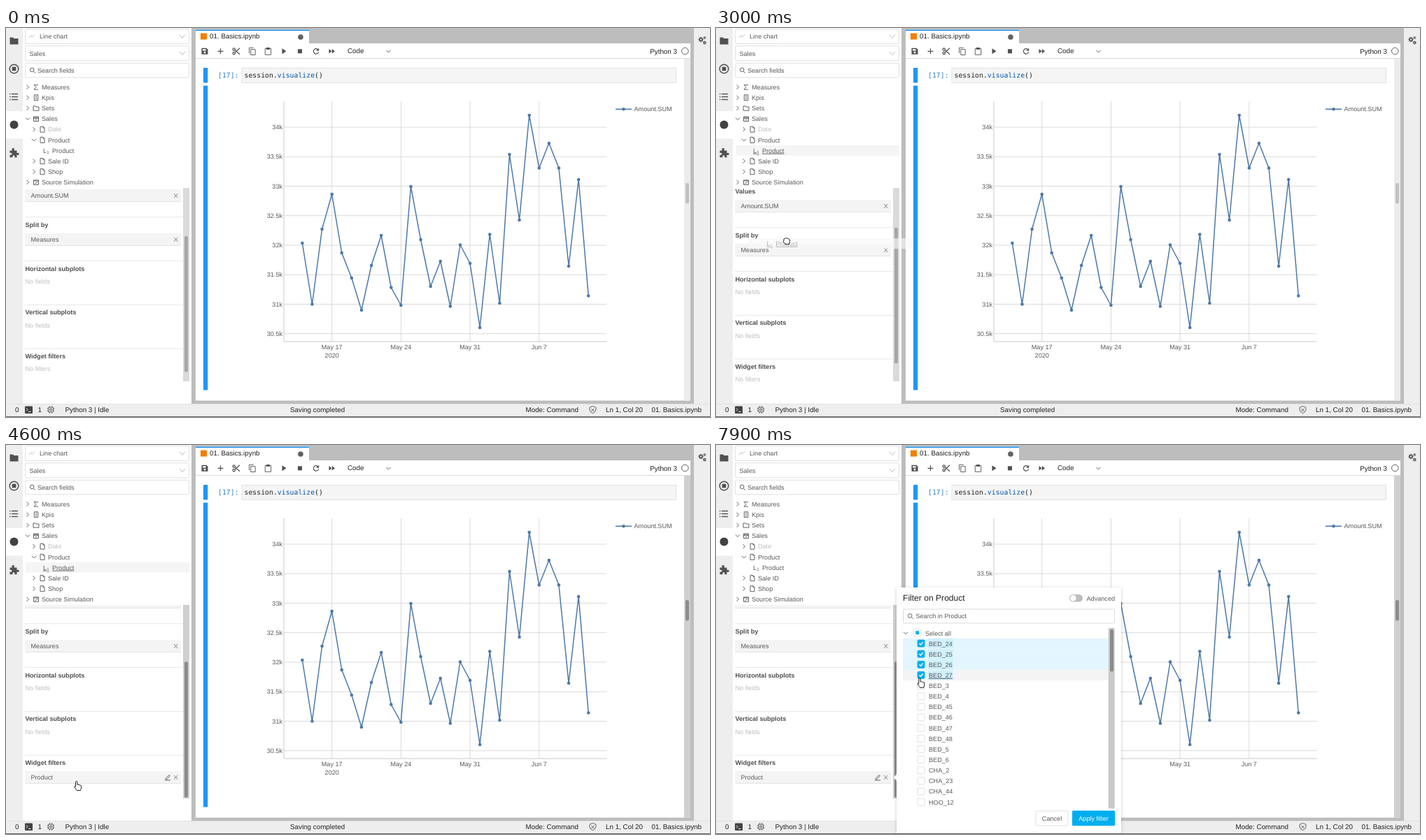
Recreate the animation shown at these times as an HTML page. Size 1006 px wide and 557 px high, loop 8000 ms.

```html
<!DOCTYPE html>
<html lang="en">
<head>
<meta charset="utf-8">
<title>Filtering a chart in a notebook</title>
<style>
html, body { margin: 0; width: 100%; height: 100%; overflow: hidden; background: #fff; }
svg { display: block; width: 1006px; height: 557px; }
text { font: 9.1px "Liberation Sans", Arial, sans-serif; fill: #595959; white-space: pre; text-rendering: geometricPrecision; }
.ui { font-size: 9.84px; fill: #212121; }
.bold { font-weight: bold; fill: #4d4d4d; }
.dim { fill: #bfbfbf; }
.code { font: 9.84px "DejaVu Sans Mono", monospace; fill: #212121; }
.title { font-size: 12.1px; fill: #222; }
.white { fill: #fff; }
.sub { font-size: 6px; }
.hover text { text-decoration: underline; }
.line { fill: none; stroke: #616161; stroke-width: 1; }
</style>
</head>
<body>
<script>
const LOOP = 8000, STEP = 100, ROW = 15.14;
const BLUE = '#2196f3', ACCENT = '#00aeef', DARK = '#505050', SERIES = '#4c78a8';

const text = (x, y, s, cls = '', anchor = 'start') =>
  `<text x="${x}" y="${y + 3.2}" class="${cls}" text-anchor="${anchor}">${s}</text>`;
const rect = (x, y, w, h, fill, extra = '') =>
  `<rect x="${x}" y="${y}" width="${w}" height="${h}" fill="${fill}" ${extra}/>`;
const box = (x, y, w, h, stroke = '#d9d9d9', fill = '#fff') =>
  rect(x, y, w, h, fill, `stroke="${stroke}" stroke-width=".8" rx="1.5"`);
const path = (d, x = 0, y = 0, extra = 'class="line"') =>
  `<path transform="translate(${x} ${y})" d="${d}" ${extra}/>`;
const solid = (d, x, y, fill = DARK) => path(d, x, y, `fill="${fill}" fill-rule="evenodd"`);
const circle = (x, y, r, extra) => `<circle cx="${x}" cy="${y}" r="${r}" ${extra}/>`;
const group = (id, body, extra = '') => `<g id="${id}" ${extra}>${body}</g>`;
const chevron = (x, y, open) => path(open ? 'M-3-1.5L0 1.5L3-1.5' : 'M-1.5-3L1.5 0L-1.5 3', x, y);
const magnifier = (x, y) => path('M1.4 1.4L4 4M2-.8a2.8 2.8 0 1 1-5.6 0a2.8 2.8 0 1 1 5.6 0', x, y);
const cross = (x, y) => path('M-2.6-3L2.6 3M2.6-3L-2.6 3', x, y, 'stroke="#777" stroke-width=".9"');
const level = (x, y) => text(x, y, 'L') + text(x + 5.3, y + 1.8, '1', 'sub');

function gear(x, y, r, teeth = 8) {
  const spokes = Array.from({ length: teeth }, (_, i) => {
    const a = i * 2 * Math.PI / teeth;
    return `M0 0L${(r * 1.35 * Math.cos(a)).toFixed(2)} ${(r * 1.35 * Math.sin(a)).toFixed(2)}`;
  }).join('');
  return path(spokes, x, y, `stroke="${DARK}" stroke-width="${r * .45}"`) +
    circle(x, y, r, `fill="${DARK}"`) + circle(x, y, r * .42, 'fill="#eee"');
}

function frame() {
  const puzzle = 'M-6-3h3.4q-1.4-3 1.2-3.4q2.8.3 1.4 3.4h4v3.6q3-1.3 3.3 1.2q-.3 2.6-3.3 1.3v3.7h-3.3q.8-3-1.3-3t-1.3 3h-4.1v-3.6q3 .6 3-1.4t-3-1.3z';
  const shield = 'M0-5L4.5-3.2V0q-.4 3.5-4.5 5.2Q-4.1 3.5-4.5 0v-3.2zM-2-1.5l4 4m0-4l-4 4';
  return rect(0, 0, 1006, 557, '#eee') +
    rect(24, 0, 241, 538, '#fff') + rect(0, 119, 25, 39.5, '#fff') +
    rect(265, 0, 718, 538, '#bdbdbd') + rect(271, 22, 707, 511.5, '#fff') +
    rect(271, 2.5, 162, 20, '#fff') + rect(271, 2.5, 162, 1.6, BLUE) +
    rect(271, 43, 707, 1, '#dcdcdc') +
    rect(0, 538, 1006, .7, '#ddd') + rect(0, 556, 1006, 1, '#666') +
    // left and right side bars
    solid('M-6-5h4.5l1.4 1.5H6V5H-6z', 11.5, 18.5) +
    circle(11.5, 58.5, 6.3, `fill="none" stroke="${DARK}" stroke-width="1.5"`) + rect(8.7, 55.7, 5.6, 5.6, DARK) +
    [-4, 0, 4].map(d => rect(5, 97.8 + d, 1.5, 1.4, DARK) + rect(8, 97.8 + d, 9, 1.4, DARK)).join('') +
    circle(11.5, 138.5, 6, 'fill="#424242"') +
    solid(puzzle, 11.5, 178.5) +
    gear(993, 16.5, 2.7) + gear(998.3, 21, 1.9) + gear(998.3, 14, 1.4) +
    // status bar
    text(13, 546.3, '0', 'ui') + rect(27, 541.5, 11, 10.5, '#424242', 'rx="1"') +
    path('M-3-2L-1 0L-3 2M0 3h3.5', 32, 546.5, 'fill="none" stroke="#fff" stroke-width=".9"') +
    text(45.5, 546.3, '1', 'ui') +
    path('M-3.4-3.4h6.8v6.8h-6.8zM-1.3-1.3h2.6v2.6h-2.6zM-1.5-5.2v1.8M1.5-5.2v1.8M-1.5 3.4v1.8M1.5 3.4v1.8M-5.2-1.5h1.8M-5.2 1.5h1.8M3.4-1.5h1.8M3.4 1.5h1.8', 64, 546.5) +
    text(84.5, 546.3, 'Python 3 | Idle', 'ui') + text(406, 546.3, 'Saving completed', 'ui') +
    text(742.5, 546.3, 'Mode: Command', 'ui') + path(shield, 838.5, 546.5) +
    text(857, 546.3, 'Ln 1, Col 20', 'ui') + text(994, 546.3, '01. Basics.ipynb', 'ui', 'end');
}

function notebook() {
  const y = 33.3;
  return rect(278, 7.5, 9, 9, '#f57c00') + text(291, 11.5, '01. Basics.ipynb', 'ui') +
    circle(421, 13, 3.8, 'fill="#616161"') +
    solid('M-4.5-4.5h7l2 2v7h-9zM-3-3v2.3h4.7v-2.3zM-1.5 1.8a1.5 1.5 0 1 0 3 0a1.5 1.5 0 1 0-3 0z', 284, y) +
    path('M-4 0h8M0-4v8', 306.5, y, `stroke="${DARK}" stroke-width="1.2"`) +
    path('M-2-2L5 4.5M-2 2L5-4.5M-1.6-2.8a1.7 1.7 0 1 1-3.4 0a1.7 1.7 0 1 1 3.4 0M-1.6 2.8a1.7 1.7 0 1 1-3.4 0a1.7 1.7 0 1 1 3.4 0', 329, y, `fill="none" stroke="${DARK}" stroke-width="1.2"`) +
    path('M-2.2-2.6h6.4v7.8h-6.4zM-4.4 2.8v-7.8h6.2', 352, y) +
    path('M-4.2-4h8.4v9h-8.4z', 374.5, y) + rect(372, 28, 5, 2.8, DARK) +
    solid('M-2.5-4L3.5 0L-2.5 4z', 397, y) + rect(417, 30.3, 6, 6, DARK) +
    path('M3.2-2A3.7 3.7 0 1 0 3.7 1', 443, y, `fill="none" stroke="${DARK}" stroke-width="1.2"`) + solid('M4.2-4.6v4h-4z', 443, y) +
    solid('M-4-3.2L0 0L-4 3.2zM.3-3.2L4.5 0L.3 3.2z', 465.5, y) +
    text(488, 33, 'Code', 'ui') + chevron(546.5, 33.5, true) +
    text(959, 33.3, 'Python 3', 'ui', 'end') +
    circle(970.3, 33, 4.8, 'fill="#fff" stroke="#616161"') +
    rect(282, 57, 6.3, 21.5, BLUE, 'rx=".8"') + rect(282, 82.5, 6.3, 436, BLUE, 'rx=".8"') +
    rect(337, 57.3, 620.5, 21, '#f5f5f5', 'stroke="#dcdcdc" stroke-width=".8"') +
    `<text x="303" y="71.3" class="code" style="fill:#307fc1">[17]:</text>` +
    `<text x="340.5" y="71.3" class="code">session.<tspan fill="#0055aa">visualize</tspan>()</text>` +
    rect(969, 44, 9, 489.5, '#ececec', 'id="mainTrack"') + rect(971, 222, 5, 29.5, '#c2c2c2', 'id="mainThumb" rx="2"');
}

function chart() {
  const ys = [308, 395.5, 288, 238, 322, 358, 404, 340, 297, 371.5, 397, 227, 303, 370, 334,
    398.5, 310.5, 337, 429, 295.5, 394, 181, 275, 125, 200.5, 165, 200.5, 341, 217, 383.5];
  const points = ys.map((y, i) => [+(423.4 + i * 14.1).toFixed(1), y]);
  let out = '';
  ['34k', '33.5k', '33k', '32.5k', '32k', '31.5k', '31k', '30.5k'].forEach((label, i) => {
    const y = 142 + i * 42.25;
    out += rect(397, y - .4, 461.5, .8, '#d2d2d2') + text(395, y, label, '', 'end');
  });
  ['May 17', 'May 24', 'May 31', 'Jun 7'].forEach((label, i) => {
    const x = 465.7 + i * 98.7;
    out += rect(x - .4, 105, .8, 344, '#d2d2d2') + text(x, 457, label, '', 'middle');
  });
  return out + text(465.7, 469, '2020', '', 'middle') +
    path('M397 105V449H858.5', 0, 0, 'fill="none" stroke="#c4c4c4" stroke-width=".9"') +
    `<polyline points="${points.join(' ')}" fill="none" stroke="${SERIES}" stroke-width="1.5" stroke-linejoin="round"/>` +
    points.map(([x, y]) => circle(x, y, 2.3, `fill="${SERIES}"`)).join('') +
    rect(871, 115.5, 23, 1.5, SERIES) + circle(882.5, 116.2, 2.3, `fill="${SERIES}"`) + text(897.5, 116.2, 'Amount.SUM');
}

// label, depth, expanded, icon
const TREE = [
  ['Measures', 0, false, 'M3-3h-6L0 0L-3 3.5h6'],
  ['Kpis', 0, false, 'M-2.7-4h5.4v8h-5.4zM-1-2h2M-1 0h2M-1 2h2'],
  ['Sets', 0, false, 'M-4-3h3l1 1.2h4V3.3h-8z'],
  ['Sales', 0, true, 'M-3.5-3h7v6.5h-7zM-3.5-2h7M-3.5-.6h7M-1 1.5h2'],
  ['Date', 1, false], ['Product', 1, true], ['Product', 2],
  ['Sale ID', 1, false], ['Shop', 1, false],
  ['Source Simulation', 0, false, 'M-3.5-3h7v6.5h-7zM-3.5-2h7M-2 2.5L2-.5']
];
const PAGE = 'M-3-4h4l2 2v6h-6zM1-4v2h2';

function tree() {
  return TREE.map(([label, depth, open, icon = PAGE], i) => {
    const y = 84.6 + i * ROW, x = 31 + depth * 9;
    const mark = depth === 2 ? level(53, y) : chevron(x, y, open) + path(icon, x + 12, y);
    const labelX = depth === 2 ? 66 : 51 + depth * 9;
    return `<g class="node">${rect(28, y - 7.4, 234, 14.8, '#f5f5f5', 'class="back" visibility="hidden"')}` +
      `${mark}${text(labelX, y, label, label === 'Date' ? 'dim' : '')}</g>`;
  }).join('');
}

function fieldPanel() {
  const select = (y, x, label) => box(27.5, y - 10.5, 234, 21) + text(x, y, label) +
    path('M-4-2.5L0 2.5L4-2.5', 252, y, 'fill="none" stroke="#bbb"');
  return select(12, 48, 'Line chart') + path('M-4 2L-1-1L1 .6L4-2.5', 37, 12, 'fill="none" stroke="#bbb"') +
    select(36.3, 33.5, 'Sales') + box(27.5, 50.3, 234, 20.5) + magnifier(38, 60.7) + text(45, 60.5, 'Search fields') + tree();
}

function chip(y, label) {
  return rect(27, y - 9, 223, 18, '#f4f4f4') + rect(27, y + 8.3, 223, .7, '#dedede') + text(35.5, y, label) + cross(242.7, y);
}

function sections() {
  const heading = (y, s) => rect(27, y - 11.3, 226, .8, '#e2e2e2') + text(27.5, y, s, 'bold');
  const pencil = path('M-3 2L2-3L3.5-1.5L-1.5 3.2H-3zM-4 4.5h8', 231, 490.5);
  return heading(219, 'Values') + chip(240, 'Amount.SUM') +
    heading(281.7, 'Split by') + chip(303, 'Measures') +
    heading(344.4, 'Horizontal subplots') + text(27.5, 362.5, 'No fields', 'dim') +
    heading(407.2, 'Vertical subplots') + text(27.5, 425.3, 'No fields', 'dim') +
    heading(470, 'Widget filters') +
    group('noFilter', text(27.5, 488.2, 'No filters', 'dim')) + group('filterChip', chip(491, 'Product') + pencil);
}

const ITEMS = ['BED_24', 'BED_25', 'BED_26', 'BED_27', 'BED_3', 'BED_4', 'BED_45', 'BED_46',
  'BED_47', 'BED_48', 'BED_5', 'BED_6', 'CHA_2', 'CHA_23', 'CHA_44', 'HOO_12'];
const CHECKED_AT = [5800, 6800, 7300, 7700];

function popup() {
  const items = ITEMS.map((label, i) => {
    const y = 284.3 + i * ROW;
    return `<g class="item">${rect(267, y - 7.57, 293.5, ROW, '#fff', 'class="back"')}` +
      rect(303, y - 7, 36, 14, '#d0f0fd', 'class="glow"') +
      rect(288, y - 5.2, 10, 10, '#fff', 'class="check" stroke="#d9d9d9" stroke-width=".8" rx="1.4"') +
      path('M-2.5 0L-.6 2L2.7-2', 293, y - .2, 'class="tick" fill="none" stroke="#fff" stroke-width="1.4"') +
      text(304, y, label) + '</g>';
  }).join('');
  return rect(258, 204, 321, 352, '#fff', 'rx="1.5" filter="url(#shadow)"') + solid('M0-5L-4.5 0L0 5z', 258.3, 476, '#fff') +
    text(267, 220, 'Filter on Product', 'title') +
    rect(505, 214, 19, 10.5, '#bdbdbd', 'rx="5.2"') + circle(510.4, 219.2, 4.2, 'fill="#fff"') + text(570, 219.5, 'Advanced', '', 'end') +
    rect(267, 234.5, 303, 21, 'none', `id="focusGlow" stroke="${ACCENT}" stroke-opacity=".25" stroke-width="3" rx="2"`) +
    rect(267.5, 235, 302, 20, '#fff', 'id="search" stroke-width=".9" rx="1.5"') +
    magnifier(278, 245.3) + text(285.5, 245, 'Search in Product') + rect(285.3, 240, .8, 10, '#222', 'id="caret"') +
    chevron(271, 269.3, true) + box(282.5, 263.8, 10.5, 10.5) + rect(285.3, 266.3, 5, 5, ACCENT, 'id="partial"') +
    text(299, 269.3, 'Select all') +
    group('items', items, 'clip-path="url(#itemClip)"') +
    rect(560.7, 262, 9, 258.5, '#c9c9c9') + rect(563, 264, 5, 60.5, '#8a8a8a', 'rx="2"') +
    box(457, 524, 46, 21) + text(480, 534.3, 'Cancel', '', 'middle') +
    rect(509, 523.6, 61, 21.6, ACCENT, 'rx="1.5"') + text(539.5, 534.3, 'Apply filter', 'white', 'middle');
}

const HAND = 'M-1.2 6.8V.3a1.2 1.2 0 0 1 2.4 0V4q1.2-.8 2 .3q1.3-.6 1.9.5q1.7-.3 1.7 1.4v2.3q0 1.6-1 2.8v1H.4q-.3-1-1.3-2L-3 6.9q.1-1.3 1.8-.1z';
const FIST = 'M-4.5 3.5q-.6-1.4.6-1.8V-.7q.2-1.2 1.6-.9q.9-1.4 2.2-.5q1.3-.9 2.1.4q1.6-.3 1.7 1.2q1 .1 1 1.3v1.4q0 1.5-1 2.7v1.5h-5.6v-.9z';
const pointer = (id, d) => path(d, 0, 0, `id="${id}" fill="#fff" stroke="#111" stroke-width=".95" stroke-linejoin="round"`);

document.body.innerHTML = `<svg viewBox="0 0 1006 557"><defs>
  <clipPath id="listClip"><rect x="24" y="229" width="241" height="277"/></clipPath>
  <clipPath id="itemClip"><rect x="266" y="276" width="296" height="244"/></clipPath>
  <filter id="shadow"><feDropShadow dx="0" dy="1" stdDeviation="2.5" flood-opacity=".2"/></filter></defs>` +
  frame() + notebook() + chart() + fieldPanel() +
  `<g clip-path="url(#listClip)">${group('sections', sections())}</g>` +
  rect(253, 229, 9, 277, '#dadada', 'id="listTrack"') + rect(255, 298, 5, 194.5, '#a6a6a6', 'id="listThumb" rx="2"') +
  group('ghost', rect(28, 168, 234, 15, '#f7f7f7', 'opacity=".65"') +
    `<g class="hover" opacity=".45">${level(53, 175.4)}${text(66, 175.4, 'Product')}</g>`) +
  group('popup', popup()) + group('cursor', pointer('hand', HAND) + pointer('fist', FIST)) + '</svg>';

const $ = id => document.getElementById(id);
const nodes = [...document.querySelectorAll('.node')], items = [...document.querySelectorAll('.item')];
const show = (el, on) => el.setAttribute('visibility', on ? 'inherit' : 'hidden');
const paint = (el, fill) => el.setAttribute('fill', fill);
const move = (el, x, y) => el.setAttribute('transform', `translate(${x.toFixed(2)} ${y.toFixed(2)})`);

// time, x, y of the pointer's hot spot
const TRACK = [[900, 86, 18], [1600, 80.5, 171], [2000, 81.5, 171], [2400, 88, 196], [2600, 88, 196],
  [3100, 104, 330], [3500, 100, 478], [3600, 99, 488], [3700, 99, 490], [3900, 100, 487], [4400, 100, 485],
  [4700, 101, 481], [5000, 262, 392], [5100, 290, 362], [5200, 298, 348], [5600, 292, 285], [5800, 292, 284],
  [6300, 292, 302], [6400, 292, 304], [6700, 292, 304], [7100, 292, 316], [7300, 292, 316], [7600, 291, 331], [7900, 291, 335]];

function hotSpot(t) {
  const next = TRACK.findIndex(p => p[0] > t);
  if (next < 1) return (next ? TRACK[TRACK.length - 1] : TRACK[0]).slice(1);
  const [a, b] = [TRACK[next - 1], TRACK[next]], k = (t - a[0]) / (b[0] - a[0]);
  return [a[1] + (b[1] - a[1]) * k, a[2] + (b[2] - a[2]) * k];
}

function render(time) {
  const t = Math.floor(time / STEP) * STEP;
  const [x, y] = hotSpot(t);
  const dragging = t >= 2000 && t < 3900, dropped = t >= 3900, open = t >= 4700;

  show($('cursor'), t >= 900);
  move($('cursor'), x, y);
  show($('hand'), t >= 900 && !dragging);
  show($('fist'), dragging);
  show($('ghost'), dragging);
  move($('ghost'), x - 81.5, y - 170);

  const hoveredNode = t < 900 || open ? -1 : t >= 1600 ? 6 : Math.floor((y - 77) / ROW);
  nodes.forEach((node, i) => {
    node.classList.toggle('hover', i === hoveredNode);
    show(node.querySelector('.back'), i === hoveredNode);
  });

  const shift = dropped ? -15 : t >= 2800 && t < 3700 ? 15 : 0;
  move($('sections'), 0, shift);
  move($('listThumb'), 0, -shift * .82);
  show($('noFilter'), !dropped);
  show($('filterChip'), dropped);
  paint($('listTrack'), dropped ? '#cfcfcf' : '#dadada');
  paint($('listThumb'), dropped ? '#8c8c8c' : '#a6a6a6');
  paint($('mainTrack'), dropped ? '#cfcfcf' : '#ececec');
  paint($('mainThumb'), dropped ? '#8c8c8c' : '#c2c2c2');

  show($('popup'), open);
  $('popup').setAttribute('opacity', t === 4700 ? .7 : 1);
  const focused = t < CHECKED_AT[0];
  show($('focusGlow'), open && focused);
  show($('caret'), open && focused);
  show($('partial'), open && !focused);
  $('search').setAttribute('stroke', focused ? ACCENT : '#d9d9d9');

  // Hover trails the pointer by one step.
  const [hx, hy] = hotSpot(t - STEP);
  const hoveredItem = hx > 267 ? Math.floor((hy - 276.7) / ROW) : -1;
  items.forEach((item, i) => {
    const hovered = i === hoveredItem, checked = t >= CHECKED_AT[i];
    const check = item.querySelector('.check');
    item.classList.toggle('hover', hovered);
    paint(item.querySelector('.back'), hovered ? '#f4f4f4' : checked ? '#e3f6fe' : '#fff');
    show(item.querySelector('.glow'), open && checked);
    show(item.querySelector('.tick'), open && checked);
    paint(check, checked ? ACCENT : '#fff');
    check.setAttribute('stroke', checked || hovered ? ACCENT : '#d9d9d9');
  });
}

const start = performance.now();
function tick() {
  render((performance.now() - start) % LOOP);
  requestAnimationFrame(tick);
}
tick();
</script>
</body>
</html>
```
